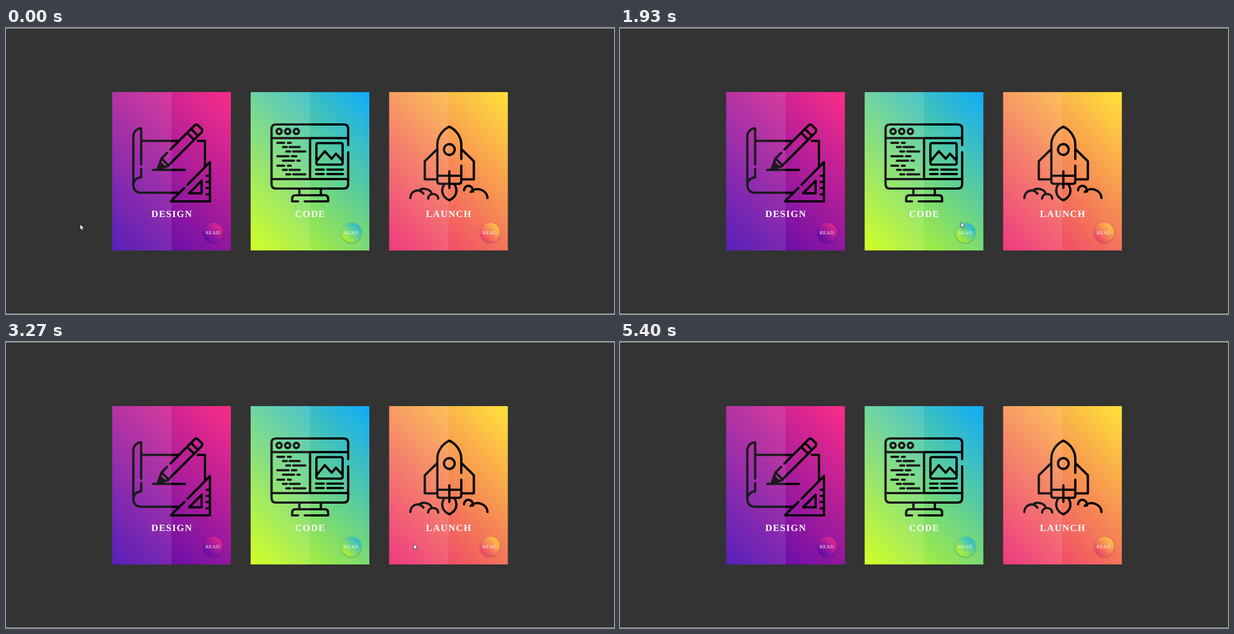
Animation of 1091 by 513 pixels, one loop 6.39 s. Source, as an HTML page:

```html
<!DOCTYPE html>
<html lang="en">
<head>
<meta charset="utf-8">
<title>Gradient cards</title>
<style>
  html, body { margin: 0; width: 100%; height: 100%; overflow: hidden; background: #333; }
  svg { display: block; font-family: "Liberation Serif", "Times New Roman", serif; text-rendering: geometricPrecision; }
  text { fill: #fff; }
  .title { font-size: 17.04px; font-weight: bold; }
  .icon { fill: none; stroke: #000; stroke-width: 4.16; stroke-linecap: round; stroke-linejoin: round; }
  .solid { fill: #000; }
  .disc { filter: drop-shadow(0 1.4px 1.8px rgba(0, 0, 0, .3)); }
  .cursor { fill: #fff; stroke: #111; stroke-width: .7; stroke-linejoin: round; }
</style>
</head>
<body>
<svg id="stage" width="1091" height="513" viewBox="0 0 1091 513"></svg>
<script>
const LOOP = 6390, TICK = 1000 / 15;
const stage = document.getElementById('stage');

const copy = [
  'Lorem ipsum dolor sit amet consectetur',
  'adipisicing elit. Accusamus sunt neque,',
  'natus perferendis quo aperiam placeat',
  'dignissimos inventore maxime quam',
  'facere esse illo veniam officiis! Est',
  'eaque quos excepturi repellendus.'
];

const dash = (y, ...ends) => {
  let d = '';
  for (let i = 0; i < ends.length; i += 2) d += `M${ends[i] + 2} ${y}H${ends[i + 1] - 2}`;
  return d;
};
const path = d => `<path d="${d}"/>`;
const circle = (x, y, r) => `<circle cx="${x}" cy="${y}" r="${r}"/>`;

const designIcon =
  // paper roll
  path('M242.5 245V180C234 180 228.5 187 228.5 195V282C228.5 290 234 295.5 242 295.5H311' +
       'M242.5 253V268C234 268 228.5 275 228.5 282M243 202.5H308M344 202.5H357V248') +
  // pencil
  path('M295 218L338.5 174.5Q341.5 172 344.5 174.5L351 181Q353.5 184 351 187L290 248' +
       'M325 188L337 200M332 181L344 193M289 224L279 234L272 254L292 247L279 234M264 254.5H321') +
  '<path class="solid" d="M272 254L277 242L284 249Z"/>' +
  // set square
  path('M326 281L366 240.5V311H295.5L320 287M328.5 296.5L351 274V296.5Z' +
       'M360 265H366M360 276H366M360 287H366M360 298.5H366');

const codeIcon =
  path('M614 210V181Q614 173 606 173H484.5Q476.5 173 476.5 181V280Q476.5 288 484.5 288H606Q614 288 614 280V223' +
       'M477 197.5H614M545.5 198V271M477 271H614') +
  [490, 505.5, 521].map(x => circle(x, 185.5, 4.6)).join('') +
  path([[0, 206], [1, 247]].map(([, y]) =>
    dash(y, 485, 501, 504, 513) + dash(y + 7.5, 495, 506, 507, 529) + dash(y + 15.5, 501, 512, 513.5, 539)).join('') +
    dash(230, 485, 509, 511, 523) + dash(238, 495, 519, 521, 529) +
    dash(254, 554.5, 572, 574.5, 606.5) + dash(262, 554.5, 572, 574.5, 606.5)) +
  path('M560 206.5H601Q604 206.5 604 209.5V242Q604 245 601 245H560Q557 245 557 242V209.5Q557 206.5 560 206.5Z' +
       'M558 238L572 221L584.5 234.5L592 225.5L603 237') +
  path('M526.5 289V300M565 289V300M524 311H513.5V306Q513.5 300 519.5 300H572Q578 300 578 306V311H536');

const launchIcon =
  path('M817 235V209C817 195 807 182 795.5 177C784 182 774 195 774 209V275Q774 279.5 779 279.5H812Q817 279.5 817 275V247' +
       'M774 265H817M795.5 257V287') +
  circle(795.5, 218, 9.6) +
  path('M773 218L751.5 239V271.5H773M818 218L839.5 239V271.5H818') +
  path('M786 281C780 291 782 303 795.5 309C809 303 811 291 805 281') +
  // smoke
  path('M725.5 305C726 291 742 287 749 297M742 291C747 286.5 759 288 763 295M757.5 306C758 295 775 295 775.5 306' +
       'M822 291C823 280 838 280 838 293.5M834 294C844 284 863 290 864 305');

// enter: hover starts, faded: icon is dim, text: copy starts to show, leave: hover ends
const cards = [
  { name: 'Design', x: 190.5, from: '#4407b2', to: '#fb2d88', icon: designIcon, enter: 400, faded: 667, text: 1133, leave: 1600 },
  { name: 'Code', x: 439, from: '#cdff0c', to: '#0eabfb', icon: codeIcon, enter: 2000, faded: 2267, text: 2667, leave: 3133 },
  { name: 'Launch', x: 687.5, from: '#ec2273', to: '#ffe33a', icon: launchIcon, enter: 3600, faded: 3667, text: 4067, leave: 4533 }
];

const gradient = (id, card, place) =>
  `<linearGradient id="${id}" ${place}><stop stop-color="${card.from}"/><stop offset="1" stop-color="${card.to}"/></linearGradient>`;

const drawCard = (card, i) => `
  ${gradient('face' + i, card, 'gradientUnits="userSpaceOnUse" x1="-17.75" y1="266.25" x2="230.75" y2="17.75"')}
  ${gradient('disc' + i, card, 'x1="0" y1="1" x2="1" y2="0"')}
  <g transform="translate(${card.x} 115)">
    <rect width="213" height="284" fill="url(#face${i})"/>
    <g class="front">
      <g class="icon" transform="translate(${-card.x} -115)">${card.icon}</g>
      <text class="title" x="107.2" y="223.7" text-anchor="middle" letter-spacing="1.42">${card.name.toUpperCase()}</text>
    </g>
    <rect width="106.5" height="284" fill="#fff" opacity=".1"/>
    <g class="button">
      <circle class="disc" cx="181.05" cy="252.05" r="17.75" fill="url(#disc${i})"/>
      <text x="180.7" y="254.9" font-size="8.52" text-anchor="middle" letter-spacing=".71">READ</text>
    </g>
    <g class="copy">
      <text class="title" x="14.2" y="97.5">${card.name}</text>
      ${copy.map((line, n) => `<text x="14.2" y="${123 + n * 13.06}" font-size="11.36">${line}</text>`).join('')}
    </g>
  </g>`;

stage.innerHTML = `<rect width="1091" height="513" fill="#333"/>
  <path d="M0 .5H1091M0 512.5H1091" stroke="#a8a8a8"/>
  ${cards.map(drawCard).join('')}
  <g class="cursor">
    <path id="arrow" d="M0 0V10L2.3 7.9L4 11.5L5.6 10.8L4 7.3H7Z"/>
    <path id="hand" d="M-1 1Q0 -.6 1 1V5L5.4 5.9Q6.7 6.3 6.5 7.8L6 10.5L5 13.5H-.8L-4 8.8Q-4 7 -2.4 7.8L-1 9Z"/>
  </g>`;

const pick = selector => [...stage.querySelectorAll(selector)];
const fronts = pick('.front'), buttons = pick('.button'), copies = pick('.copy');
const [cursor] = pick('.cursor'), [arrow] = pick('#arrow'), [hand] = pick('#hand');

// time, x, y of the pointer tip
const track = [
  [0, 133, 352], [133, 165, 354], [400, 352, 363], [533, 365, 363], [1600, 365, 363],
  [1733, 473, 377], [1800, 473, 377], [1933, 612, 348], [2000, 612, 348], [2067, 619, 350],
  [2400, 620, 350], [2467, 621, 351], [2667, 621, 351], [2867, 621, 381], [3000, 622, 374],
  [3133, 622, 374], [3267, 732, 362], [3333, 732, 362], [3533, 866, 363], [3600, 866, 363],
  [3667, 863, 364], [4533, 863, 364], [4667, 600, 460], [4733, 471, 487], [5333, 103, 504]
];
const EXIT = 5360;

const ramp = (t, start, end) => Math.min(1, Math.max(0, (t - start) / (end - start)));
const show = (el, visible) => el.style.display = visible ? '' : 'none';

function pointerAt(t) {
  const i = track.findIndex(key => key[0] > t);
  if (i < 0) return track.at(-1).slice(1);
  const [t0, x0, y0] = track[i - 1], [t1, x1, y1] = track[i];
  const k = ramp(t, t0, t1);
  return [x0 + (x1 - x0) * k, y0 + (y1 - y0) * k];
}

function draw(now) {
  // the motion advances at 15 steps per second
  const t = Math.floor((now % LOOP) / TICK + .06) * TICK;
  cards.forEach((card, i) => {
    const back = 1 - ramp(t, card.leave, card.leave + 133);
    const hover = ramp(t, card.enter, card.faded) * back;
    fronts[i].style.opacity = 1 - .9 * hover;
    buttons[i].style.opacity = 1 - hover;
    copies[i].style.opacity = ramp(t, card.text, card.text + 267) * back;
  });
  const overButton = cards.some(card => t >= card.enter - 1 && t <= card.leave + 1);
  show(cursor, t < EXIT);
  show(arrow, !overButton);
  show(hand, overButton);
  cursor.setAttribute('transform', `translate(${pointerAt(t)})`);
  requestAnimationFrame(() => draw(performance.now()));
}
draw(0);
</script>
</body>
</html>
```
